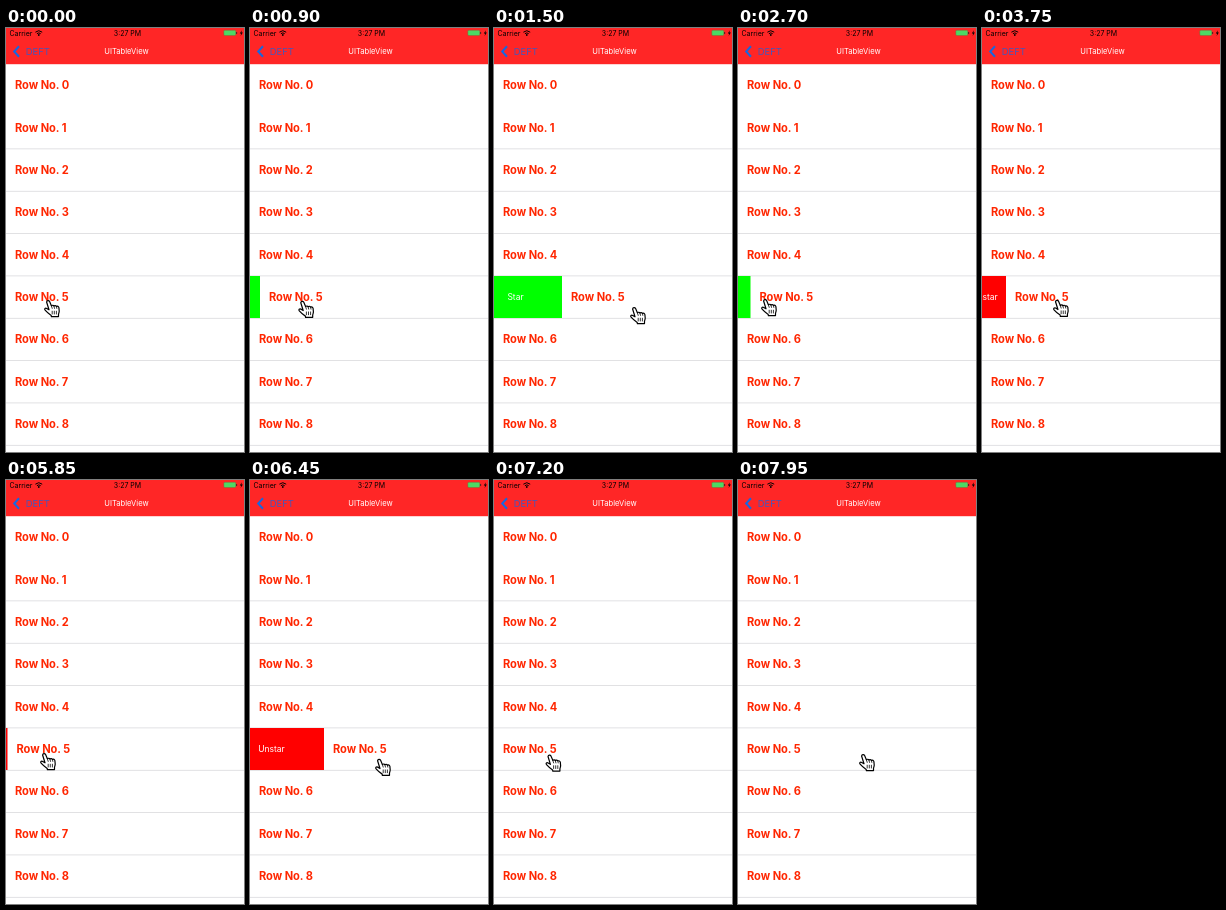
These frames come from a looping animation (238x424 px, 8000 ms). An HTML page:

```html
<!DOCTYPE html>
<html lang="en">
<head>
<meta charset="utf-8">
<title>Table swipe actions</title>
<style>
  html, body { margin: 0; width: 100%; height: 100%; overflow: hidden; background: #fff; }
  svg { display: block; }
  text { font-family: Inter, "Open Sans", sans-serif; }
  .status { font-size: 7px; fill: #000; }
  .title { font-size: 7.6px; fill: #fff; text-anchor: middle; }
  .back { font-size: 9.4px; fill: #4a55b8; }
  .row { font-size: 11.1px; font-weight: 700; letter-spacing: -.05px; fill: #ff2600; }
  .action { font-size: 8.5px; fill: #fff; text-anchor: middle; }
  .line { fill: #d4d4d8; }
</style>
</head>
<body>
<svg width="238" height="424" viewBox="0 0 238 424">
  <rect width="238" height="424" fill="#fff"/>
  <rect width="238" height="36.2" fill="#ff2626"/>

  <text class="status" x="3.5" y="7.5">Carrier</text>
  <path d="M29.4 4.2Q32.8 1.2 36.2 4.2M30.9 5.7Q32.8 4.1 34.7 5.7" fill="none" stroke="#000"/>
  <circle cx="32.8" cy="7" r=".9"/>
  <text class="status" x="121.5" y="7.5" text-anchor="middle">3:27 PM</text>
  <rect x="217.8" y="2.3" width="12" height="5.2" rx="1" fill="#4cd964" stroke="#7a5a30" stroke-width=".4"/>
  <rect x="230.3" y="4" width=".8" height="2" fill="#222"/>
  <path d="M235.8 2.2L233.8 5.4H235.2L234.6 8L236.9 4.5H235.4Z"/>

  <path d="M13 18.3L8.2 23.5L13 28.7" fill="none" stroke="#1668e0" stroke-width="2"/>
  <text class="back" x="19.8" y="26.8">DEFT</text>
  <text class="title" x="120.5" y="26">UITableView</text>

  <g id="rows"></g>
  <rect id="button" y="248" height="42"/>
  <text id="label" class="action" y="272"></text>

  <g id="hand" stroke="#000" stroke-linecap="round" stroke-linejoin="round">
    <path fill="#fff" stroke-width="1.2" d="M2.6 2C2.9 .4 4.9 .2 5.6 1.6L7.4 5.8C8.1 5 9.5 5.1 9.9 6C10.7 5.2 12.1 5.5 12.4 6.4C13.5 5.9 14.6 6.5 14.9 7.6L15.2 11C15.3 12.6 14.5 13.4 14.5 14.6V16.6H7.4L7.2 15.4C5 14 3.2 12.6 1.1 10.2C0 8.9 1.4 7.6 2.7 8.4L5 9.8Z"/>
    <path fill="none" stroke-width=".8" d="M7.4 5.8L8.2 8.4M9.9 6L10.5 8.4M12.4 6.4L12.8 8.4M8.2 11.2V14M10.3 11.2V14M12.4 11.2V14"/>
  </g>
</svg>
<script>
const LOOP = 8000, TICK = 150;
const OPEN = 43, STRETCH = .45, SETTLE = 146;
const PITCH = 42.34, SWIPED = 5;
const $ = id => document.getElementById(id);

// Points the hand eases between: time, x, y
const path = [
  [750, 38, 272], [1500, 136, 279], [2250, 23, 271], [2850, 23, 271],
  [3300, 47, 271], [3450, 47, 271], [4200, 115, 273], [4500, 106, 273],
  [5400, 106, 273], [6050, 13, 273], [6600, 150, 280], [6750, 150, 280],
  [7300, 42, 274], [7800, 211, 282], [7950, 121, 274]
];

// A swipe without a close time snaps shut when it is let go
const swipes = [
  { grab: 750, drop: 1550, close: 2520, label: "Star", fill: "#0f0" },
  { grab: 3450, drop: 4350, close: 5360, label: "Unstar", fill: "#f00" },
  { grab: 6050, drop: 6560, label: "Unstar", fill: "#f00" },
  { grab: 7300, drop: 7900, label: "Star", fill: "#0f0" }
];

const smooth = u => u * u * (3 - 2 * u);
const decay = ms => Math.exp(-ms / SETTLE);

function handAt(t) {
  const i = path.findIndex(p => p[0] >= t);
  const b = path[i], a = path[i - 1] || b;
  const u = a === b ? 0 : smooth((t - a[0]) / (b[0] - a[0]));
  return { x: a[1] + (b[1] - a[1]) * u, y: a[2] + (b[2] - a[2]) * u };
}

// Follows the hand, with resistance past the open position
function pulled(s, t) {
  const d = Math.max(0, handAt(t).x - handAt(s.grab).x);
  return Math.min(d, OPEN) + Math.max(0, d - OPEN) * STRETCH;
}

function offset(s, t) {
  if (t < s.drop) return t < s.grab ? 0 : pulled(s, t);
  if (!s.close) return 0;
  if (t < s.close) return OPEN + (pulled(s, s.drop) - OPEN) * decay(t - s.drop);
  return OPEN * decay(t - s.close);
}

function add(tag, attrs, text = "") {
  const el = document.createElementNS("http://www.w3.org/2000/svg", tag);
  for (const name in attrs) el.setAttribute(name, attrs[name]);
  el.textContent = text;
  return $("rows").appendChild(el);
}

const rows = Array.from({ length: 9 }, (_, i) => {
  const y = i * PITCH;
  if (i) add("rect", { class: "line", x: 0, y: 78.2 + y, width: 238, height: .7 });
  return add("text", { class: "row", x: 9, y: 61.2 + y }, "Row No. " + i);
});

function draw(now) {
  const t = Math.floor(now % LOOP / TICK) * TICK;
  const swipe = swipes.findLast(s => s.grab <= t) || swipes[0];
  const dx = Math.round(offset(swipe, t) * 2) / 2;
  const { x, y } = handAt(t);
  rows[SWIPED].setAttribute("x", 9 + dx);
  $("button").setAttribute("width", dx);
  $("button").setAttribute("fill", swipe.fill);
  $("label").textContent = swipe.label;
  $("label").setAttribute("x", OPEN / 2 + Math.min(dx - OPEN, 0));
  $("hand").setAttribute("transform", `translate(${x} ${y})`);
}

const start = performance.now();
function frame() {
  draw(performance.now() - start);
  requestAnimationFrame(frame);
}
frame();
</script>
</body>
</html>
```
